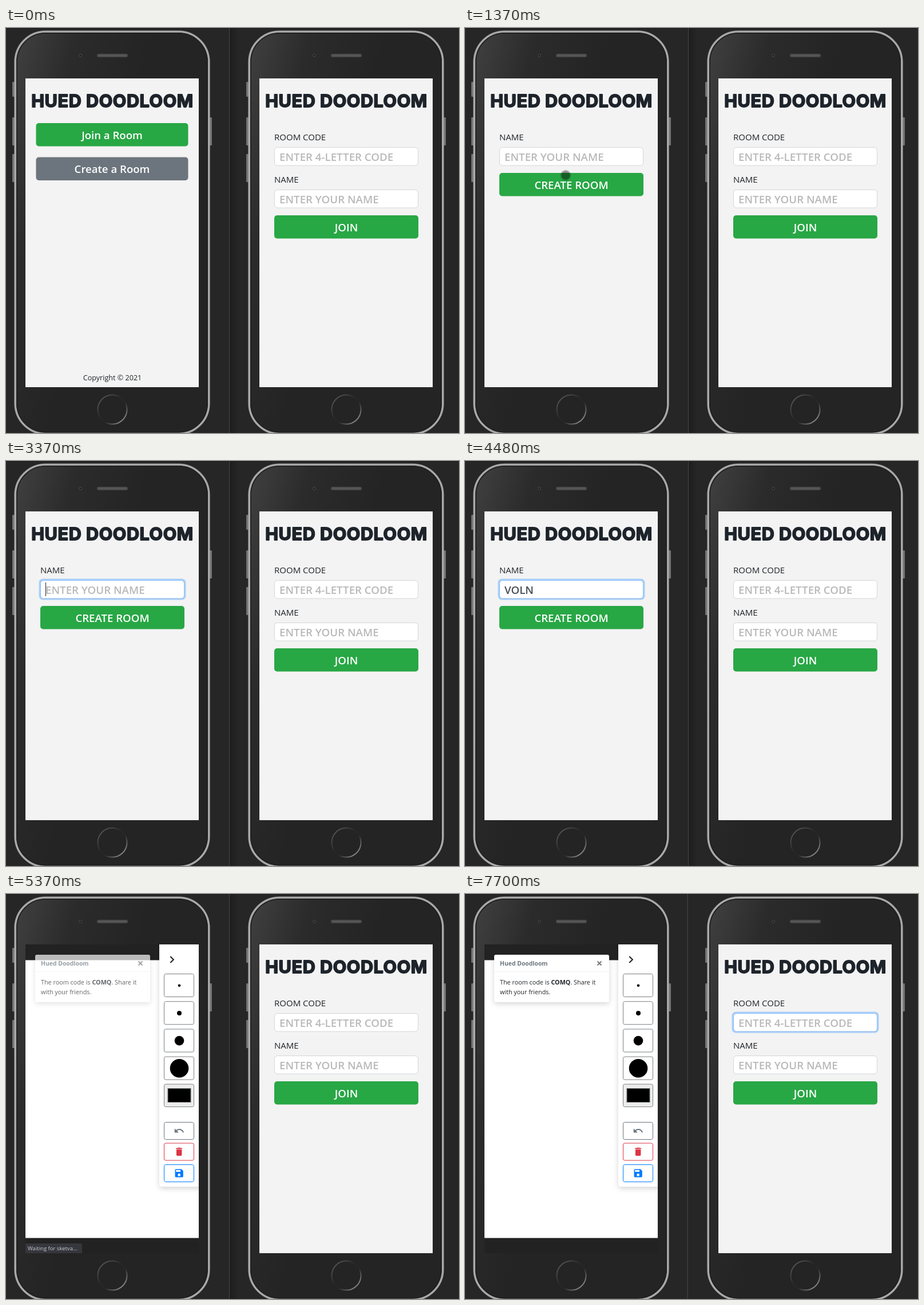
Recreate the animation shown at these times as an HTML page. Size 792 by 707 pixels, loop 8 s.

```html
<!DOCTYPE html>
<html lang="en">
<head>
<meta charset="utf-8">
<title>Shared drawing demo</title>
<style>
  html, body { margin: 0; width: 100%; height: 100%; overflow: hidden; background: #262626; }
  svg { display: block; width: 792px; height: 707px; font-family: "Open Sans", "Noto Sans", sans-serif; }
  .title { font: 700 30.5px Inter, sans-serif; letter-spacing: .6px; fill: #1e242b; stroke: #1e242b;
           stroke-width: 1.8; stroke-linejoin: round; text-anchor: middle; }
  .button { font-size: 18.6px; font-weight: 600; fill: #fff; text-anchor: middle; }
  .field { font-size: 18.7px; font-weight: 600; }
  .label { font-size: 15px; fill: #212529; }
  .small { font-size: 10.8px; fill: #212529; }
</style>
</head>
<body>
<svg id="stage" viewBox="0 0 792 707">
  <defs>
    <linearGradient id="body" x2=".55" y2=".3">
      <stop stop-color="#414141"/><stop offset=".45" stop-color="#2b2b2b"/><stop offset="1" stop-color="#242424"/>
    </linearGradient>
    <linearGradient id="home" x2="1" y2="1">
      <stop offset=".15" stop-color="#505050"/><stop offset=".45" stop-color="#272727"/>
      <stop offset=".6" stop-color="#272727"/><stop offset=".85" stop-color="#808080"/>
    </linearGradient>
    <linearGradient id="shade">
      <stop stop-color="#1d1d1d"/><stop offset="1" stop-color="#1d1d1d" stop-opacity="0"/>
    </linearGradient>
    <filter id="shadow" x="-30%" y="-30%" width="160%" height="160%">
      <feDropShadow dx="0" dy="3" stdDeviation="5" flood-opacity=".17"/>
    </filter>
    <clipPath id="screen"><rect x="34" y="88" width="303" height="539"/></clipPath>
  </defs>
</svg>
<script>
const LOOP = 8000, PHONE_GAP = 409;
const APP = "Hued Doodloom", PLAYER = "VOLN";
const GREEN = "#28a745", GREY = "#6c757d";
const stage = document.getElementById("stage");

const rect = (x, y, w, h, fill, rx = 0, extra = "") =>
  `<rect x="${x}" y="${y}" width="${w}" height="${h}" fill="${fill}" rx="${rx}" ${extra}/>`;
const circle = (x, y, r, fill = "#000", extra = "") =>
  `<circle cx="${x}" cy="${y}" r="${r}" fill="${fill}" ${extra}/>`;
const text = (x, y, cls, words, extra = "") =>
  `<text x="${x}" y="${y}" class="${cls}" ${extra}>${words}</text>`;
const group = (id, content, extra = "") => `<g id="${id}" ${extra}>${content}</g>`;

const button = (x, y, w, words, fill = GREEN) =>
  rect(x, y, w, 40.5, fill, 5) + text(x + w / 2, y + 27.8, "button", words);

const field = (id, x, y, hint) =>
  rect(x - 2.5, y - 2.5, 257, 37, "#a9cff9", 7, `id="${id}Glow" opacity="0"`) +
  rect(x + .5, y + .5, 251, 31.5, "#fff", 5, `stroke="#d3d6d9"`) +
  rect(x + .5, y + .5, 251, 31.5, "none", 5, `id="${id}Edge" stroke="#8abff9" opacity="0"`) +
  text(x + 9, y + 24, "field", hint, `id="${id}Text" fill="#b9b9b9"`) +
  rect(x + 9, y + 4, 1, 24, "#222", 0, `id="${id}Caret"`);

const title = text(186, 138.3, "title", APP.toUpperCase());

function phone() {
  const keys = [[11, 94, 26], [11, 156, 49], [11, 220, 49], [356, 156, 49]];
  return keys.map(([x, y, h]) => rect(x, y, 4, h, "#747474", 1)).join("") +
    rect(16.2, 6.2, 338.6, 702, "url(#body)", 53, `stroke="#a8a8a8" stroke-width="3.6"`) +
    rect(19, 9, 333, 696.4, "none", 50, `stroke="#1e1e1e" stroke-width="1.6"`) +
    circle(130, 48, 2.2, "#171717", `stroke="#555"`) +
    rect(159, 45, 54, 6, "#4b4b4b", 3) + rect(161, 47, 50, 2, "#595959", 1) +
    circle(186, 666, 25.5, "none", `stroke="url(#home)" stroke-width="2"`) +
    rect(34, 88, 303, 539, "#f3f3f3");
}

const homePage = title + button(52.5, 166, 266, "Join a Room") +
  button(52.5, 225.5, 266, "Create a Room", GREY) +
  text(186, 615.3, "label", "Copyright © 2021", `text-anchor="middle" style="font-size:12.6px"`);

const createPage = title + text(60, 196, "label", "NAME") +
  field("name", 60, 208, "ENTER YOUR NAME") + button(60, 253, 252, "CREATE ROOM");

const joinPage = title + text(60, 196, "label", "ROOM CODE") +
  field("code", 60, 208, "ENTER 4-LETTER CODE") + text(60, 270, "label", "NAME") +
  field("guest", 60, 282, "ENTER YOUR NAME") + button(60, 327, 252, "JOIN");

function drawPage() {
  const tool = (y, h, color, content, fill = "#fff") =>
    rect(276.5, y + .5, 52, h, fill, 3, `stroke="${color}"`) + content;
  const icon = (y, color, d) =>
    tool(y, 30, color, `<path transform="translate(293.2 ${y + 5.8}) scale(.79)" fill="${color}" fill-rule="evenodd" d="${d}"/>`);
  const brushes = [2.3, 4, 8.3, 16.3].map((r, i) =>
    tool(139 + 48.2 * i, 40, "#7b7f83", circle(303, 159.7 + 48.2 * i, r))).join("");
  const toolbar =
    `<path d="M268 70H350V511H274q-6 0-6-6z" fill="#fff" filter="url(#shadow)"/>` +
    `<path d="M287.3 109l5.6 5.5-5.6 5.5" fill="none" stroke="#222" stroke-width="2"/>` + brushes +
    tool(331.5, 39.5, "#7b7f83", rect(283, 339.5, 40, 24, "#000", 0, `stroke="#6b716d"`), "#ececec") +
    icon(398, GREY, "M12.5 8c-2.7 0-5.1 1-6.9 2.6L2 7v9h9l-3.6-3.6c1.4-1.2 3.1-1.9 5.1-1.9 3.5 0 6.5 2.3 7.6 5.5l2.4-.8C21 11 17.2 8 12.5 8z") +
    icon(434.5, "#dc3545", "M6 19q0 2 2 2h8q2 0 2-2V7H6zM19 4h-3.5l-1-1h-5l-1 1H5v2h14z") +
    icon(472, "#007bff", "M17 3H5q-2 0-2 2v14q0 2 2 2h14q2 0 2-2V7zM12 19a3 3 0 1 1 0-6 3 3 0 0 1 0 6zM15 9H5V5h10z");
  const toast =
    rect(51, 106, 201, 82.5, "#fff", 3, `filter="url(#shadow)"`) +
    `<path d="M51 135.5H252" stroke="#f1f1f1"/>` +
    text(61, 125, "small", APP, `font-weight="700" style="fill:${GREY};font-size:10.4px"`) +
    `<path d="M231.5 117.5l7 7m0-7l-7 7" stroke="#777" stroke-width="1.8"/>` +
    text(61, 158, "small", `The room code is <tspan font-weight="700">COMQ</tspan>. Share it`) +
    text(61, 174.5, "small", "with your friends.");
  const status = `<path d="M34 610H130q3 0 3 3V627H34z" fill="#36373d"/>` +
    text(38, 622, "small", "Waiting for sketva...", `style="fill:#c9cbd0;font-size:9.5px"`);
  return rect(34, 88, 303, 539, "#222") + rect(34, 115.5, 303, 485, "#fff") +
    toolbar + group("toast", toast) + group("status", status);
}

stage.insertAdjacentHTML("beforeend",
  rect(0, 0, 792, 707, "#262626") + rect(0, 0, 792, 1, "#1c1c1c") +
  group("divider", rect(390, 0, 1.2, 707, "#444") + rect(391.2, 0, 15, 707, "url(#shade)", 0, `id="dividerShade"`)) +
  group("left", phone() + group("home1", homePage) + group("create1", createPage) +
    group("draw1", drawPage(), `clip-path="url(#screen)"`)) +
  group("right", phone() + joinPage, `transform="translate(${PHONE_GAP})"`) +
  group("touch", circle(0, 0, 9.2, "#000", `opacity=".24"`) + circle(0, 0, 7.3, "#000", `opacity=".27"`)) +
  group("arrow", `<path d="M.5.5v12l2.8-2.6 2 4.4 2-1-2-4.2h4z" fill="#fff" stroke="#111"/>`));

const $ = id => document.getElementById(id);
const show = (id, on) => $(id).setAttribute("display", on ? "inline" : "none");
const fade = (id, value) => $(id).setAttribute("opacity", value);
const within = (t, a, b) => t >= a && t < b;
const progress = (t, a, b) => Math.min(1, Math.max(0, (t - a) / (b - a)));
const ease = p => p * p * (3 - 2 * p);

// start, end, from x, from y, to x, to y
const moves = [
  [160, 440, 735, 458, 414, 692],
  [1370, 1870, 176, 257, 182, 232],
  [4980, 5300, 197, 271, 197, 271],
  [5700, 5820, 316, 323, 316, 323],
  [5820, 6000, 351, 221, 351, 221],
  [6200, 6250, 386, 196, 386, 196],
  [7180, 7630, 586, 233, 586, 233],
];

function drawPointer(t) {
  const move = moves.find(([a, b]) => within(t, a, b));
  let inside = false;
  if (move) {
    const [a, b, x0, y0, x1, y1] = move;
    const p = ease(progress(t, a + 50, b - 50));
    const x = x0 + (x1 - x0) * p, y = y0 + (y1 - y0) * p;
    inside = y > 88 && y < 627 && (within(x, 34, 337) || within(x, 443, 746));
    $(inside ? "touch" : "arrow").setAttribute("transform", `translate(${x} ${y})`);
  }
  show("touch", inside);
  show("arrow", move && !inside);
}

function focusField(id, amount) {
  fade(id + "Glow", amount);
  fade(id + "Edge", amount);
}

function drawNameField(t) {
  const typed = PLAYER.slice(0, [3550, 3605, 3660, 3910].filter(at => t >= at).length);
  const label = $("nameText");
  label.textContent = typed || "ENTER YOUR NAME";
  label.setAttribute("fill", typed ? "#495057" : "#b9b9b9");
  const width = typed && t < 5120 ? label.getComputedTextLength() : 0;
  $("nameCaret").setAttribute("x", 69 + width);
  show("nameCaret", within(t, 2370, 2870) || within(t, 3370, 4410));
  focusField("name", ease(progress(t, 2240, 2440)) - ease(progress(t, 4980, 5120)));
}

function render(t) {
  show("home1", t < 1370);
  show("create1", within(t, 1370, 5120));
  show("draw1", t >= 5120);
  drawNameField(t);
  fade("toast", progress(t, 5260, 5420));
  show("status", t < 5560);

  const resized = t >= 7130;
  $("divider").setAttribute("transform", `translate(${resized ? -1.5 : 0})`);
  show("dividerShade", !resized);
  focusField("code", ease(progress(t, 7150, 7310)));
  show("codeCaret", within(t, 7200, 7700));
  show("guestCaret", false);
  drawPointer(t);
}

const start = performance.now();
function tick() {
  render((performance.now() - start) % LOOP);
  requestAnimationFrame(tick);
}
tick();
</script>
</body>
</html>
```
